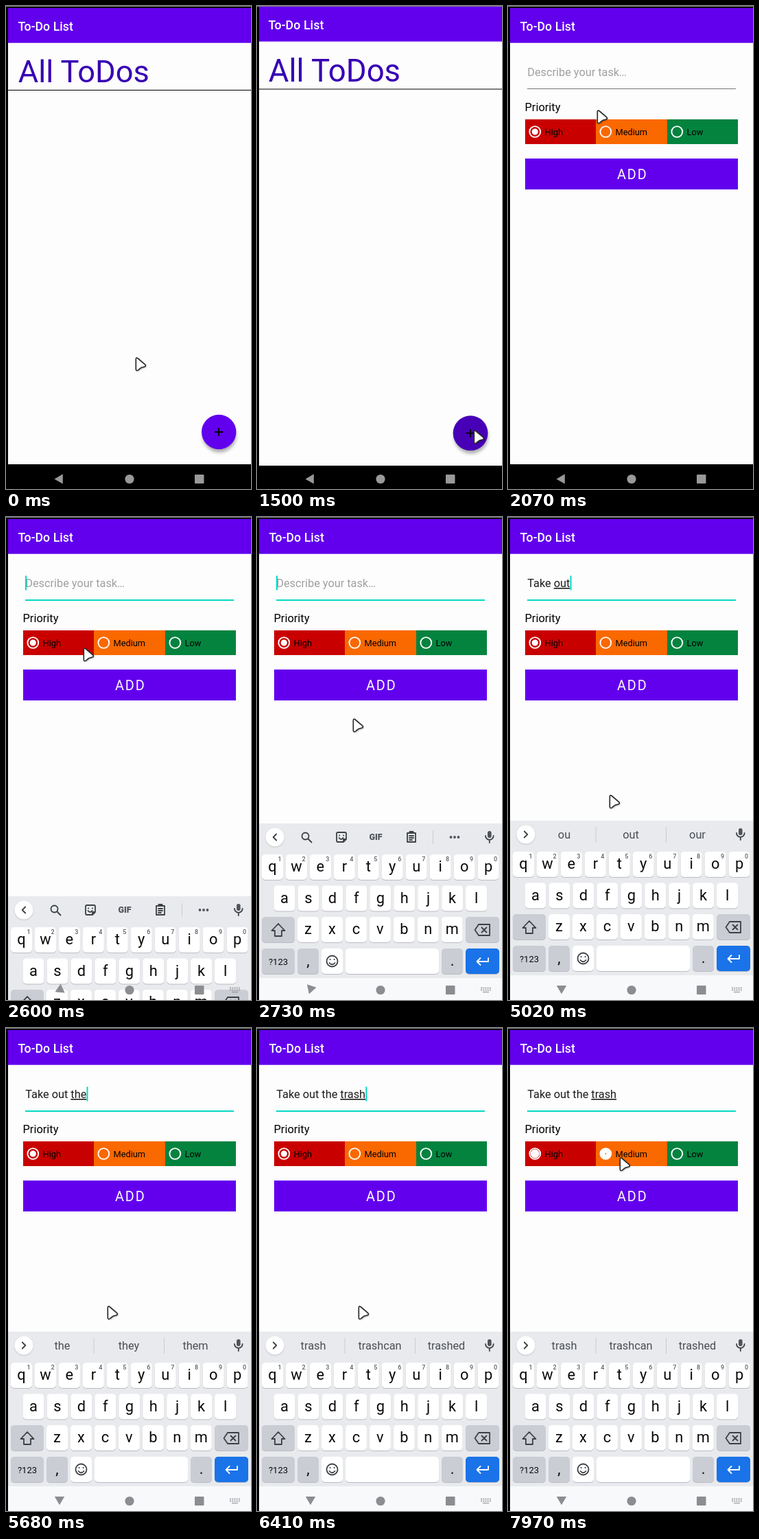
An HTML page for the animation above (8000 ms loop, 357 by 703 pixels).

```html
<!DOCTYPE html>
<html lang="en">
<head>
<meta charset="utf-8">
<title>To-Do List</title>
<style>
html, body { margin: 0; width: 100%; height: 100%; overflow: hidden; background: #000; }
svg { display: block; width: 100vw; height: 100vh; }
text { font-family: Roboto, "Noto Sans", sans-serif; white-space: pre; }
.mid { text-anchor: middle; }
.line { fill: none; stroke: #3c4043; stroke-width: 1.8; stroke-linejoin: round; stroke-linecap: round; }
.word { text-decoration: underline; text-decoration-thickness: 1px; }
</style>
</head>
<body>
<svg id="stage" viewBox="0 0 357 703" xmlns="http://www.w3.org/2000/svg">
  <defs>
    <filter id="soft" x="-50%" y="-50%" width="200%" height="200%"><feGaussianBlur stdDeviation="2.6"/></filter>
    <filter id="faint" x="-50%" y="-50%" width="200%" height="200%"><feGaussianBlur stdDeviation="1"/></filter>
    <g id="page">
      <rect x="3" y="3" width="354" height="664" fill="#fdfdfd"/>
      <rect x="3" y="3" width="354" height="50.7" fill="#6200ee"/>
      <text x="17.6" y="36" font-size="17.6" font-weight="500" letter-spacing=".08" fill="#fff">To-Do List</text>
    </g>
    <path id="pointer" d="M1.3 3Q1.3 .2 4 1.8L14.4 10.6Q16.8 13 13.8 14L9.4 15.2Q8.600 15.400 5 18.600Q1.300 21 1.300 17.600Z"/>
  </defs>
  <rect width="357" height="703" fill="#000"/>

  <g id="list">
    <use href="#page"/>
    <text x="17.8" y="111.3" font-size="45.2" fill="#3700b3">All ToDos</text>
    <path d="M3 122.5H357" stroke="#000"/>
    <circle cx="311" cy="625" r="24.5" opacity=".32" filter="url(#soft)"/>
    <circle id="fab" cx="310.2" cy="620" r="25.2"/>
    <path d="M304 620H316.2M310 614V626" stroke="#000" stroke-width="1.8"/>
  </g>

  <g id="form">
    <use href="#page"/>
    <text id="field" x="28.3" y="102" font-size="16.3"><tspan id="done"></tspan><tspan id="word" class="word"></tspan></text>
    <path id="rule"/>
    <rect id="caret" y="85.5" width="2" height="21" fill="#03dac5"/>
    <text x="24.5" y="153" font-size="16.4">Priority</text>
    <g id="radios"></g>
    <rect x="25" y="222" width="310" height="45" fill="#6200ee"/>
    <text x="159" y="252.4" font-size="19.8" letter-spacing="1.9" fill="#fff">ADD</text>
  </g>

  <rect id="navBack" x="3" y="667" width="354" height="36" fill="#f8f9fb"/>
  <g id="keyboard">
    <rect x="3" y="442" width="354" height="225" fill="#e8eaed"/>
    <rect x="3" y="667" width="354" height="40" fill="#f8f9fb"/>
    <circle cx="26" cy="463" r="13.5" opacity=".16" filter="url(#faint)"/>
    <circle cx="26" cy="462" r="13.5" fill="#fff"/>
    <path id="chevron" class="line"/>
    <g fill="#50545a">
      <rect x="336" y="453" width="5.6" height="10" rx="2.8"/>
      <path class="line" d="M333 460a5.8 5.8 0 0 0 11.6 0M338.8 466v4"/>
    </g>
    <g id="tools">
      <g class="line">
        <circle cx="70.5" cy="464.5" r="5" transform="translate(0 -4)"/><path d="M74.5 464.5l5 5"/>
        <path d="M118 455h10q2 0 2 2v8l-4 4h-8q-2 0-2-2v-10q0-2 2-2ZM130 465h-4v4M119.5 463q3 4 6 0M120 459.5h.2M126 459.5h.2"/>
        <path d="M219 456h12v13h-12ZM222.5 456v-2h5v2M222 460h6M222 463h6M222 466h4"/>
      </g>
      <text class="mid" x="173" y="466" font-size="12.5" font-weight="800" fill="#50545a">GIF</text>
      <path d="M256.5 452v20" stroke="#c9ccd1"/>
      <g fill="#50545a"><circle cx="282.5" cy="462" r="1.9"/><circle cx="288" cy="462" r="1.9"/><circle cx="293.5" cy="462" r="1.9"/></g>
    </g>
    <g id="hints">
      <path d="M128 451v23M230.5 451v23" stroke="#c9ccd1"/>
      <g class="mid" font-size="16.3" fill="#4a4d52"><text x="82" y="468"></text><text x="179" y="468"></text><text x="276" y="468"></text></g>
    </g>
    <g id="keys"></g>
    <g class="line">
      <path d="M31 588l9.5 10H36v8H26v-8h-4.5Z"/>
      <path d="M317.5 597l5.5-8H339v16H323ZM327.5 593.5l7 7M334.5 593.5l-7 7"/>
      <circle cx="109.5" cy="642.5" r="8"/><path d="M105.5 645q4 4.5 8 0M106.5 640h.2M112.5 640h.2"/>
      <path d="M337 638v5H320.5M325.5 638l-5 5 5 5" style="stroke:#fff"/>
    </g>
  </g>

  <g id="nav">
    <path id="back" d="M70.8 682H85.2L78 694.3Z"/>
    <circle cx="180" cy="688.5" r="6.6"/>
    <rect x="275" y="682" width="13.5" height="13" rx="1"/>
    <g id="switcher" fill="none" stroke="#8b8d91" opacity=".75"><path d="M326 685.5H341M326 688.5H341" stroke-width="2" stroke-dasharray="2 1.2"/><path d="M329 691.5h9" stroke-width="1.5"/></g>
  </g>
  <rect width="3" height="703"/>
  <rect width="357" height="1" fill="#85828c"/>
  <g id="cursor">
    <use href="#pointer" x=".8" y="1.2" opacity=".4" filter="url(#faint)"/>
    <use href="#pointer" fill="#fff" stroke="#2c2c2c" stroke-width="1.7"/>
  </g>
</svg>
<script>
const LOOP = 8000;
const $ = id => document.getElementById(id);
const set = (el, attrs) => { for (const k in attrs) el.setAttribute(k, attrs[k]); return el; };
const show = (id, on) => { $(id).style.display = on ? '' : 'none'; };
const add = (parent, tag, attrs, text = '') => {
  const el = set(document.createElementNS('http://www.w3.org/2000/svg', tag), attrs);
  el.textContent = text;
  return parent.appendChild(el);
};
// Latest row whose start time has passed
const hold = (rows, t) => rows.findLast(row => row[0] <= t);

const pointerStops = [
  [0, 188, 511], [280, 165, 488], [430, 109, 470], [580, 135, 488], [740, 205, 530],
  [890, 285, 590], [1050, 336, 620], [1200, 315, 617], [1780, 290, 540], [1920, 200, 300],
  [2070, 129, 151], [2210, 100, 104], [2340, 92, 96], [2600, 112, 190], [2730, 139, 293],
  [2880, 145, 360], [3030, 147, 404], [7000, 147, 396], [7130, 149, 345], [7260, 153, 285],
  [7390, 157, 232], [7530, 161, 198], [7660, 162, 188]
];
const typing = [
  [0, '', ''],
  [4050, '', 'T', 'T', 'The', 'This'],
  [4190, '', 'Ta', 'Ta', 'Take', 'Talk'],
  [4330, '', 'Tak', 'Tak', 'Take', 'Taking'],
  [4460, '', 'Take', 'Take', 'Taken', 'Takes'],
  [4600, 'Take ', 'o', 'o', 'out', 'on'],
  [4740, 'Take ', 'ou', 'ou', 'out', 'our'],
  [5020, 'Take ', 'out', 'ou', 'out', 'our'],
  [5150, 'Take ', 'out', 'out', 'outside', 'outs'],
  [5280, 'Take out ', ''],
  [5400, 'Take out ', 't', 't', 'the', 'to'],
  [5540, 'Take out ', 'th', 'th', 'the', 'that'],
  [5670, 'Take out ', 'the', 'the', 'they', 'them'],
  [5800, 'Take out the ', 't', 't', 'to', 'the'],
  [5920, 'Take out the ', 'tr', 'tr', 'trash', 'try'],
  [6170, 'Take out the ', 'tra', 'tra', 'trash', 'travel'],
  [6290, 'Take out the ', 'tras', 'tras', 'trash', 'trashed'],
  [6410, 'Take out the ', 'trash', 'trash', 'trashcan', 'trashed']
];
const slide = [[2600, 110, 65], [2730, 4, 18], [2880, 0, 0]];   // time, offset, back-icon angle
const caretOn = [[0, 0], [2480, 1], [3030, 0], [3550, 1], [7000, 0], [7450, 1], [7970, 0]];

const radios = [['High', 25, '#c90000'], ['Medium', 128, '#fa6800'], ['Low', 232, '#04833f']].map(([name, x, fill]) => {
  const g = $('radios');
  add(g, 'rect', { x, y: 165, width: 335 - x, height: 36, fill });
  add(g, 'text', { x: x + 28.5, y: 187.7, 'font-size': 12.8 }, name);
  const spot = { cx: x + 14.3, cy: 183 };
  add(g, 'circle', { ...spot, r: 7.9, fill: 'none', stroke: '#fff', 'stroke-width': 1.9 });
  return { dot: add(g, 'circle', { ...spot, fill: '#fff' }), core: add(g, 'circle', { ...spot, fill }) };
});

function key(x, y, w, label, fill = '#fff', size = 21.8) {
  const g = $('keys');
  add(g, 'rect', { x, y: y + 1, width: w, height: 37, rx: 5, fill: '#b9bcc2' });
  add(g, 'rect', { x, y, width: w, height: 37, rx: 5, fill });
  if (label) add(g, 'text', { class: 'mid', x: x + w / 2, y: y + (size < 20 ? 23.5 : 25), 'font-size': size, fill: '#0a0a0a' }, label);
}
[['qwertyuiop', 7, 487], ['asdfghjkl', 24.5, 532.5], ['zxcvbnm', 59, 578]].forEach(([letters, x0, y], row) =>
  [...letters].forEach((letter, i) => {
    const x = x0 + i * 34.95;
    key(x, y, 31, letter);
    if (!row) add($('keys'), 'text', { class: 'mid', x: x + 26, y: y + 10, 'font-size': 9, 'font-weight': 500, fill: '#5a5d62' }, (i + 1) % 10);
  }));
const grey = '#cacdd4';
key(7, 578, 48, '', grey);
key(304, 578, 49, '', grey);
key(7, 624, 48, '?123', grey, 13);
key(59, 624, 31, ',', grey);
key(94, 624, 31);
key(129, 624, 136);
key(269, 624, 31, '.', grey);
key(304, 624, 49, '', '#1a73e8');

const zoom = s => `translate(180 360) scale(${s}) translate(-180 -360)`;

function draw(t) {
  const [, px, py] = hold(pointerStops, t);
  set($('cursor'), { transform: `translate(${px} ${py})` });

  show('list', t < 1780);
  set($('list'), { transform: zoom(t < 1500 ? 1 : t < 1640 ? 1.0066 : 1.045) });
  set($('fab'), { fill: t < 1500 ? '#6200ee' : '#4700b5' });
  show('form', t >= 1640);
  set($('form'), { transform: zoom(t < 1780 ? 0.98 : 1), opacity: t < 1780 ? 0.9 : 1 });

  const [, done, word, ...hints] = hold(typing, t);
  const empty = !done && !word;
  $('done').textContent = empty ? 'Describe your task…' : done;
  $('word').textContent = word;
  set($('field'), { fill: empty ? '#a0a0a0' : '#1c1c1c' });
  const focused = t >= 2480;
  set($('rule'), focused
    ? { d: 'M28 121H332', stroke: '#03dac5', 'stroke-width': 2 }
    : { d: 'M28 120.5H332', stroke: '#777', 'stroke-width': 1 });
  show('caret', hold(caretOn, t)[1]);
  set($('caret'), { x: 28 + (empty ? 0 : $('field').getComputedTextLength() + 0.5) });

  const switching = t >= 7970;
  const dotSizes = switching ? [6.4, 8, 0] : [4.6, 0, 0];
  radios.forEach(({ dot, core }, i) => {
    set(dot, { r: dotSizes[i] });
    set(core, { r: switching && i === 1 ? 1 : 0 });
  });

  const kb = hold(slide, t);
  ['keyboard', 'navBack', 'switcher'].forEach(id => show(id, kb));
  set($('keyboard'), { transform: `translate(0 ${kb ? kb[1] : 0})` });
  set($('back'), { transform: `rotate(${kb ? kb[2] : 90} 77.2 687.6)` });
  set($('nav'), { fill: kb ? '#8b8d91' : '#999' });
  const hinting = hints.length > 0;
  show('tools', !hinting);
  show('hints', hinting);
  set($('chevron'), { d: hinting ? 'M23.8 457.5l4.5 4.5-4.5 4.5' : 'M28.2 457.5l-4.5 4.5 4.5 4.5' });
  document.querySelectorAll('#hints text').forEach((el, i) => { el.textContent = hints[i] || ''; });
}

let start;
function tick(now) {
  start ??= now;
  draw((now - start) % LOOP);
  requestAnimationFrame(tick);
}
draw(0);
requestAnimationFrame(tick);
</script>
</body>
</html>
```
